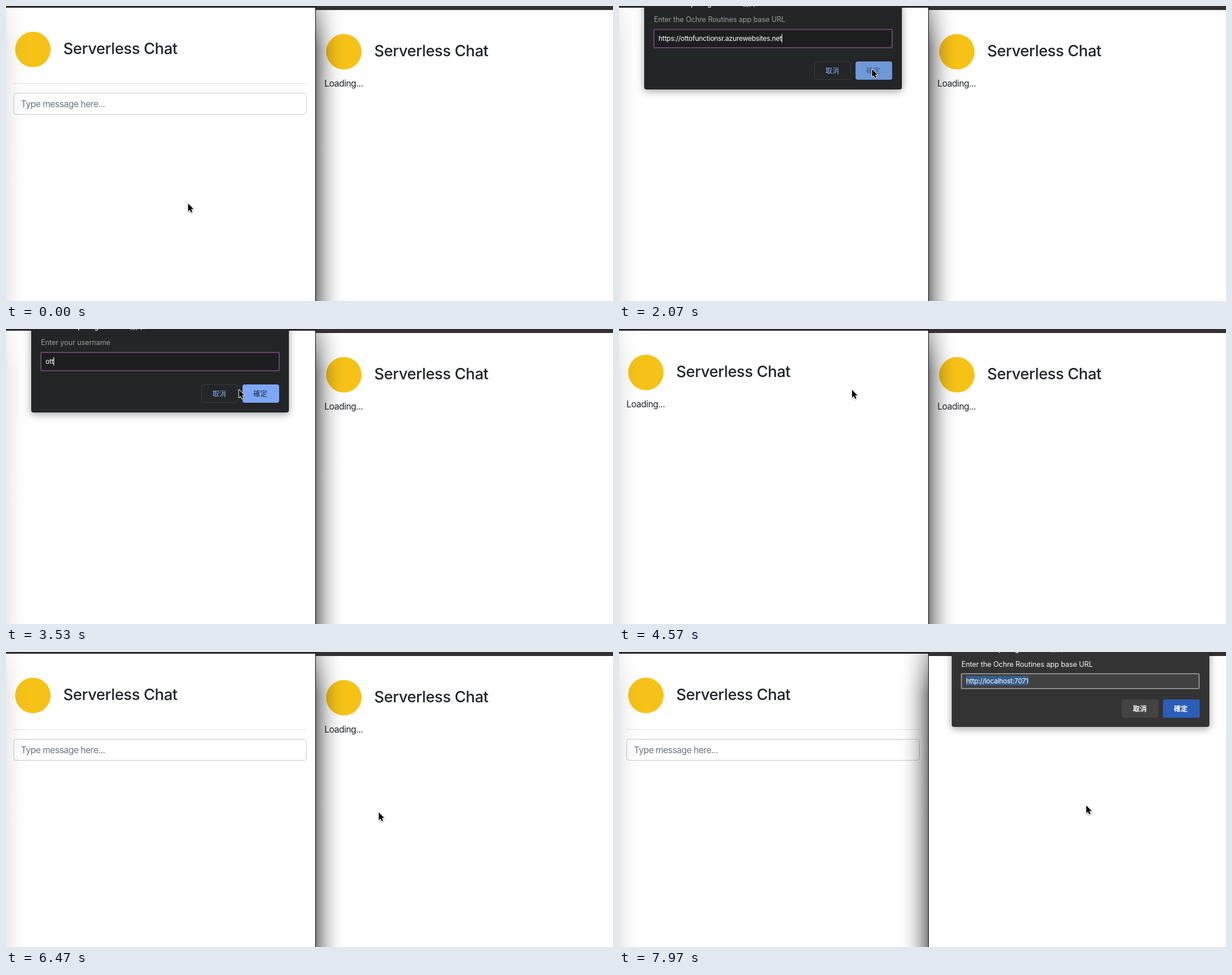
Animation, 1060 px wide and 516 px high, one loop 8000 ms. Source, as an HTML page with a canvas:

```html
<!DOCTYPE html>
<html lang="en">
<head>
<meta charset="utf-8">
<title>Serverless Chat</title>
<style>
html, body { margin: 0; width: 100%; height: 100%; overflow: hidden; background: #fff; }
canvas { display: block; width: 1060px; height: 516px; }
</style>
</head>
<body>
<canvas id="stage" width="1060" height="516"></canvas>
<script>
const ctx = document.getElementById('stage').getContext('2d');
const W = 1060, H = 516, LOOP = 8000, SPLIT = 540;
const SANS = 'Inter, "Noto Sans CJK TC", "Noto Sans CJK JP", "Noto Sans CJK", sans-serif';

const LABEL_URL = 'Enter the Ochre Routines app base URL';
const LABEL_USER = 'Enter your username';
const LOCAL_URL = 'http://localhost:7071';
const SITE_URL = 'https://ottofunctionsr.azurewebsites.net';
const USER = 'otto';

// Moments at which the picture switches, in ms
const T = {
  leftBlank: 320, urlOpen: 450, paste: 1250, urlClose: 2160,
  userOpen: 2320, typeStart: 3210, typeStep: 140, userClose: 3900,
  leftLoading: 3980, leftReady: 6050, focusRight: 6900,
  rightBlank: 7240, rightOpen: 7440
};

// Pointer path: time, x, y
const PATH = [
  [0, 318, 345], [180, 318, 345], [640, 477, 168], [690, 477, 168],
  [840, 462, 122], [1200, 446, 112], [1700, 442, 110], [2560, 442, 110],
  [2950, 407, 106], [4580, 407, 106], [4800, 424, 389], [5010, 430, 264],
  [5850, 440, 262], [6440, 651, 280], [6490, 651, 280], [6680, 769, 299],
  [7560, 790, 299], [7920, 816, 268], [8000, 816, 268]
];

const LEFT_THEME = {
  x: 44, bottom: 146, bg: '#232527', label: '#9a9da1', labelY: 28, titleY: 0,
  field: [61, 41, 416, 32], fieldBg: '#1c1e20', fieldLine: '#694470', fieldR: 2,
  buttonY: 97, cancelBg: '#232527', cancelLine: '#3a3d41', cancelText: '#84b1f5',
  okBg: '#7ea7f8', okHover: '#6f98d8', okText: '#202735', okHoverText: '#3f5784',
  buttonR: 4, weight: 400, select: '#3d5f91'
};
const RIGHT_THEME = {
  x: 581, bottom: 131, bg: '#333333', label: '#f4f4f4', labelY: 26, titleY: -1,
  field: [598, 38, 415, 26], fieldBg: '#414141', fieldLine: '#8b8b8b', fieldR: 1,
  buttonY: 83, cancelBg: '#434343', cancelLine: '#434343', cancelText: '#ffffff',
  okBg: '#2b5eb9', okHover: '#3a6cc4', okText: '#ffffff', okHoverText: '#ffffff',
  buttonR: 2, weight: 600, select: '#365d8f'
};

function pointerAt(t) {
  let i = 1;
  while (i < PATH.length - 1 && PATH[i][0] < t) i++;
  const [t0, x0, y0] = PATH[i - 1], [t1, x1, y1] = PATH[i];
  const u = Math.min(1, Math.max(0, (t - t0) / (t1 - t0)));
  const k = u * u * (3 - 2 * u);
  return { x: x0 + (x1 - x0) * k, y: y0 + (y1 - y0) * k };
}

function rect(x, y, w, h, color) {
  ctx.fillStyle = color;
  ctx.fillRect(x, y, w, h);
}

function box(x, y, w, h, r, fill, line, width = 1) {
  ctx.beginPath();
  ctx.roundRect(x, y, w, h, r);
  ctx.fillStyle = fill;
  ctx.fill();
  if (!line) return;
  ctx.strokeStyle = line;
  ctx.lineWidth = width;
  ctx.stroke();
}

function text(str, x, y, size, color, weight = 400, spacing = 0, align = 'left') {
  ctx.font = `${weight} ${size}px ${SANS}`;
  ctx.letterSpacing = spacing + 'px';
  ctx.textAlign = align;
  ctx.textBaseline = 'alphabetic';
  ctx.fillStyle = color;
  ctx.fillText(str, x, y);
  return ctx.measureText(str).width;
}

function header(x, y) {
  ctx.beginPath();
  ctx.arc(x + 34, y + 31, 31, 0, Math.PI * 2);
  ctx.fillStyle = '#f6c217';
  ctx.fill();
  text('Serverless Chat', x + 87, y + 39, 27, '#212529', 500, -0.4);
}

function loading(x, y) {
  text('Loading...', x, y, 15.5, '#212529', 400, -0.5);
}

function messageForm() {
  rect(13, 135, 512, 1, '#e2e2e3');
  box(13.5, 152.5, 511, 37, 4, '#fff', '#c6c9d0');
  text('Type message here...', 26, 177, 15.5, '#6c757d', 400, -0.53);
}

// Soft shade cast by the focused window on its neighbour
function shade(x, dir, width, strength, top) {
  const g = ctx.createLinearGradient(x, 0, x + dir * width, 0);
  for (let i = 0; i <= 10; i++) {
    const u = i / 10;
    g.addColorStop(u, `rgba(0,0,0,${strength * Math.pow(1 - u, 2.3)})`);
  }
  ctx.fillStyle = g;
  const left = dir > 0 ? x : x - width;
  const fade = 72, step = 4;
  for (let y = 0; y < fade; y += step) {
    ctx.globalAlpha = 0.45 + 0.55 * y / fade;
    if (y + step > top) {
      const y0 = Math.max(top, y);
      ctx.fillRect(left, y0, width, y + step - y0);
    }
  }
  ctx.globalAlpha = 1;
  ctx.fillRect(left, fade, width, H - fade);
}

function dialog(th, label, value, selected, caret, pointer) {
  const x = th.x;
  ctx.save();
  ctx.shadowColor = 'rgba(0,0,0,.38)';
  ctx.shadowBlur = 14;
  ctx.shadowOffsetY = 3;
  box(x, -30, 450, th.bottom + 30, 4, th.bg);
  ctx.restore();

  const titleColor = '#e8eaed';
  const tw = text('azure-samples.github.io', x + 17, th.titleY, 12.5, titleColor, 600, -0.1);
  text('顯示', x + 17 + tw + 10, th.titleY, 13, titleColor);
  text(label, x + 17, th.labelY, 12.5, th.label, 400, -0.1);

  const [fx, fy, fw, fh] = th.field;
  box(fx, fy, fw, fh, th.fieldR, th.fieldBg, th.fieldLine, 2);
  const mid = fy + fh / 2, base = Math.round(mid + 4);
  ctx.font = `400 12px ${SANS}`;
  ctx.letterSpacing = '-0.28px';
  const width = ctx.measureText(value).width;
  if (selected) rect(x + 25, base - 13, width, 16, th.select);
  text(value, x + 25, base, 12, '#ffffff', 400, -0.28);
  if (caret) rect(Math.round(x + 25 + width), base - 12, 1, 15, '#ffffff');

  const by = th.buttonY, ox = x + 369;
  const hover = pointer.x >= ox && pointer.x < ox + 64 &&
    pointer.y >= by && pointer.y < by + 32;
  box(x + 297.5, by + 0.5, 63, 31, th.buttonR, th.cancelBg, th.cancelLine);
  text('取消', x + 328.5, by + 20.5, 12, th.cancelText, th.weight, 0, 'center');
  box(ox, by, 64, 32, th.buttonR, hover ? th.okHover : th.okBg);
  text('確定', ox + 31, by + 20.5, 12, hover ? th.okHoverText : th.okText,
    th.weight === 400 ? 500 : th.weight, 0, 'center');
}

function leftDialog(t, pointer) {
  if (t >= T.urlOpen && t < T.urlClose) {
    const pasted = t >= T.paste;
    dialog(LEFT_THEME, LABEL_URL, pasted ? SITE_URL : LOCAL_URL, !pasted, pasted, pointer);
  } else if (t >= T.userOpen && t < T.userClose) {
    const n = Math.max(0, Math.floor((t - T.typeStart) / T.typeStep) + 1);
    const caret = n > 0 || (t - T.userOpen) % 1000 < 500;
    dialog(LEFT_THEME, LABEL_USER, USER.slice(0, n), false, caret, pointer);
  }
}

function drawLeft(t, pointer) {
  const ready = t < T.leftBlank || t >= T.leftReady;
  rect(0, 0, SPLIT, H, '#fff');
  if (ready || t >= T.leftLoading) header(13, 45);
  if (ready) messageForm();
  else if (t >= T.leftLoading) loading(13, 137);
  shade(0, 1, 48, 0.085, 3);
  if (t >= T.focusRight) shade(SPLIT, -1, 56, 0.5, 3);
  rect(0, 0, SPLIT, 3, '#2b272a');
  leftDialog(t, pointer);
}

function drawRight(t, pointer) {
  rect(SPLIT, 0, W - SPLIT, H, '#fff');
  if (t < T.rightBlank) {
    header(556, 49);
    loading(556, 141);
  }
  if (t < T.focusRight) shade(SPLIT + 1, 1, 56, 0.5, 7);
  rect(SPLIT, 0, W - SPLIT, 7, '#323031');
  if (t >= T.rightOpen) {
    ctx.globalAlpha = Math.min(1, 0.4 + (t - T.rightOpen) / 200);
    dialog(RIGHT_THEME, LABEL_URL, LOCAL_URL, true, false, pointer);
    ctx.globalAlpha = 1;
  }
  rect(SPLIT, 0, 1, H, '#0c0c0c');
}

function drawPointer({ x, y }) {
  ctx.save();
  ctx.translate(x, y);
  ctx.beginPath();
  ctx.moveTo(0, 0.5);
  ctx.lineTo(0, 14);
  ctx.lineTo(3, 11.2);
  ctx.lineTo(5.2, 16);
  ctx.lineTo(7.4, 15);
  ctx.lineTo(5.3, 10.3);
  ctx.lineTo(9.4, 10.1);
  ctx.closePath();
  ctx.lineJoin = 'round';
  ctx.shadowColor = 'rgba(0,0,0,.4)';
  ctx.shadowBlur = 3;
  ctx.shadowOffsetY = 1;
  ctx.strokeStyle = '#fff';
  ctx.lineWidth = 2;
  ctx.stroke();
  ctx.shadowColor = 'transparent';
  ctx.fillStyle = '#000';
  ctx.fill();
  ctx.restore();
}

const start = performance.now();
function frame(now) {
  const t = Math.max(0, now - start) % LOOP;
  const pointer = pointerAt(t);
  drawLeft(t, pointer);
  drawRight(t, pointer);
  drawPointer(pointer);
  requestAnimationFrame(frame);
}
frame(start);
</script>
</body>
</html>
```
